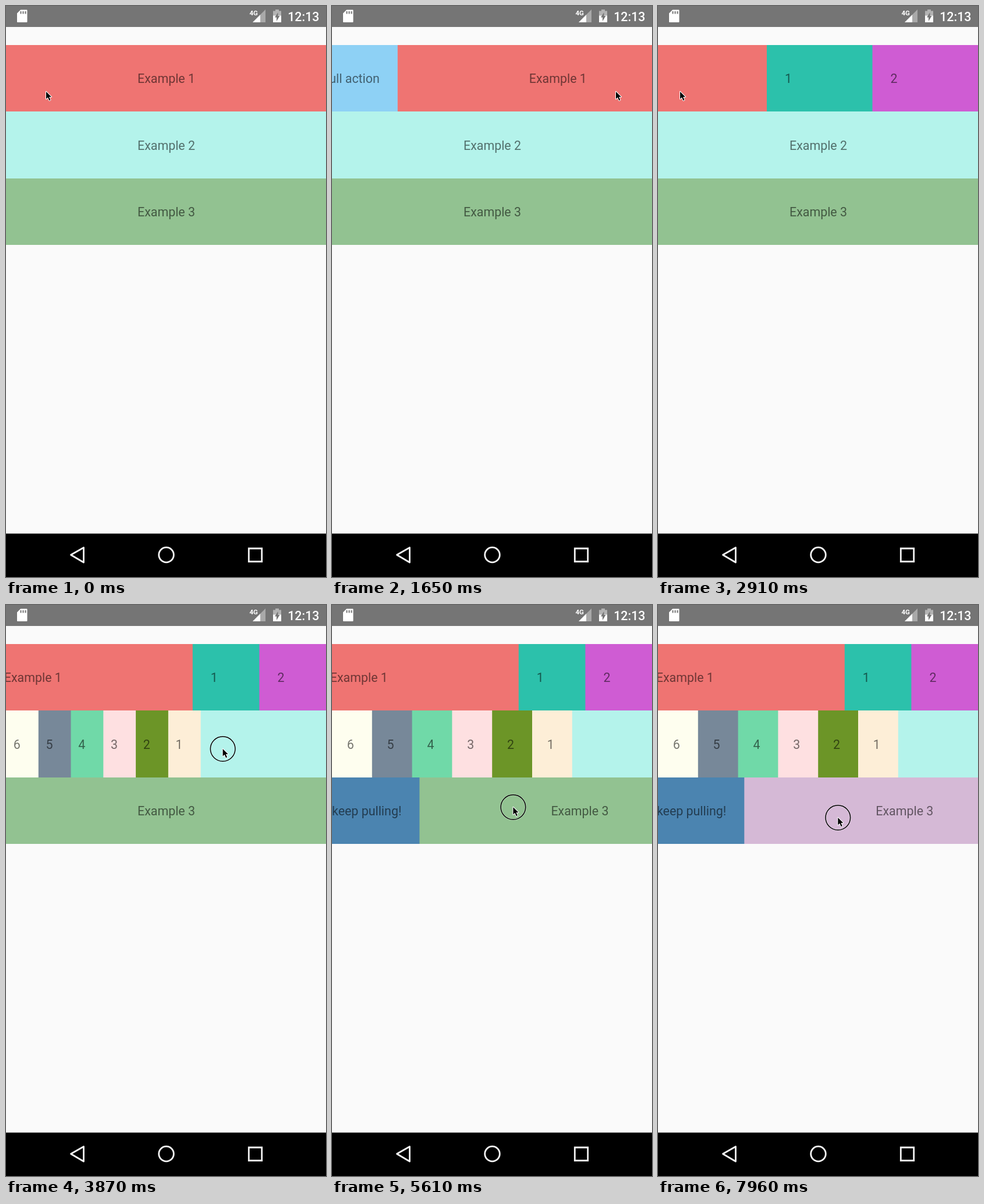
Animation, 550 px wide and 980 px high, one loop 8000 ms. Source, as an HTML page with a canvas:

```html
<!DOCTYPE html>
<html lang="en">
<head>
<meta charset="utf-8">
<title>Swipeable rows</title>
<style>
  html, body { margin: 0; width: 100%; height: 100%; overflow: hidden; background: #fafafa; }
  canvas { display: block; }
</style>
</head>
<body>
<canvas id="stage" width="550" height="980"></canvas>
<script>
const ctx = document.getElementById('stage').getContext('2d');
const LOOP = 8000, WIDTH = 550, ROW_TOP = 66.5, ROW_HEIGHT = 114.6;
const PADDING = 31, SETTLE = 250, ACTIVATION = 306;
const INK = 'rgba(0,0,0,.54)';

// Pointer moves: [start, end, destination]
const xMoves = [[250, 1420, 488], [1950, 2780, 38], [3450, 4070, 480], [4130, 4622, 161],
  [5050, 6254, 496], [6620, 7150, 161], [7400, 8615, 496]];
const yMoves = [[3000, 3350, 247], [4440, 4750, 347], [6700, 7100, 365]];

// Touches: where each swiped row comes to rest after release
const touches = [
  { row: 0, down: 180, up: 1529, rest: 0 },
  { row: 0, down: 1850, up: 2833, rest: -229.2 },
  { row: 1, down: 3400, up: 4110, rest: 412.8 },
  { row: 2, down: 4960, up: 6410, rest: 0 },
  { row: 2, down: 7330, up: 9000, rest: 0 }
];

const rightButtons = ['#2cc1ab', '#cf5cd3'];
const leftButtons = ['#fdeed7', '#6c9527', '#fee0e1', '#70d9a8', '#778899', '#fefeef'];

function track(start, moves, t) {
  let value = start;
  for (const [from, to, target] of moves) {
    if (t <= from) break;
    const s = Math.min(1, (t - from) / (to - from));
    value += (target - value) * s * s * (3 - 2 * s);
  }
  return value;
}
const pointerX = t => track(69, xMoves, t);
const pointerY = t => track(147, yMoves, t);

function swipe(row, t) {
  let offset = 0, active = false;
  for (const touch of touches) {
    if (touch.row !== row || t < touch.down) continue;
    const dragged = pointerX(Math.min(t, touch.up)) - pointerX(touch.down);
    const s = Math.min(1, Math.max(0, t - touch.up) / SETTLE);
    offset = touch.rest + (dragged - touch.rest) * (s ? Math.cos(s * Math.PI / 2) ** 4 : 1);
    if (t < touch.up) offset = dragged;
    active = s < 1 && dragged >= ACTIVATION;
  }
  return { offset, active };
}

function rect(color, x, y, w, h) {
  ctx.fillStyle = color;
  ctx.fillRect(x, y, w, h);
}

function polygon(points, fill, stroke, lineWidth) {
  ctx.beginPath();
  points.forEach(([x, y]) => ctx.lineTo(x, y));
  ctx.closePath();
  if (stroke) {
    ctx.strokeStyle = stroke;
    ctx.lineWidth = lineWidth;
    ctx.stroke();
  }
  if (fill) {
    ctx.fillStyle = fill;
    ctx.fill();
  }
}

function ring(x, y, r, color, lineWidth) {
  ctx.beginPath();
  ctx.arc(x, y, r, 0, Math.PI * 2);
  ctx.strokeStyle = color;
  ctx.lineWidth = lineWidth;
  ctx.stroke();
}

function text(string, x, y, align = 'left', color = INK, font = '400 21.4px') {
  ctx.font = font + ' Roboto, sans-serif';
  ctx.textAlign = align;
  ctx.fillStyle = color;
  ctx.fillText(string, x, y);
}

const rowY = i => Math.round(ROW_TOP + i * ROW_HEIGHT);
const baseline = i => ROW_TOP + (i + .5) * ROW_HEIGHT + 8.4;

function drawRow(i, color, offset) {
  rect(color, 0, rowY(i), WIDTH, rowY(i + 1) - rowY(i));
  text('Example ' + (i + 1), WIDTH / 2 + offset + .5, baseline(i), 'center');
}

function drawLeft(i, color, label, edge) {
  if (edge <= 0) return;
  rect(color, 0, rowY(i), edge, rowY(i + 1) - rowY(i));
  text(label, edge - PADDING, baseline(i), 'right');
}

function drawRows(t) {
  const [first, second, third] = [0, 1, 2].map(i => swipe(i, t));

  drawRow(0, '#ef7472', first.offset);
  drawLeft(0, '#8ed1f5', 'Pull action', first.offset);
  if (first.offset < 0) rightButtons.forEach((color, i) => {
    const x = WIDTH + first.offset * (1 - i / rightButtons.length);
    rect(color, x, rowY(0), WIDTH - x, rowY(1) - rowY(0));
    text(i + 1, x + PADDING, baseline(0));
  });

  drawRow(1, '#b4f3eb', second.offset);
  leftButtons.forEach((color, i) =>
    drawLeft(1, color, i + 1, second.offset * (1 - i / leftButtons.length)));

  drawRow(2, t < 6410 + SETTLE ? '#92c291' : '#d5b9d6', third.offset);
  if (third.active) drawLeft(2, '#f9fbd0', 'release!', third.offset);
  else drawLeft(2, '#4b84b0', 'keep pulling!', third.offset);
}

function drawStatusBar() {
  const bar = '#757575';
  rect(bar, 0, 0, WIDTH, 36);
  ctx.lineJoin = 'round';
  polygon([[25.5, 7.5], [35.5, 7.5], [35.5, 27], [20, 27], [20, 13]], '#fff', '#fff', 2);
  [25, 29, 33].forEach(x => rect(bar, x - .5, 9, 2, 4.5));
  text('4G', 418.5, 16, 'left', '#fff', '700 11.5px');
  polygon([[424, 28], [446, 6], [446, 28]], '#a9a9a9');
  polygon([[424, 28], [437, 15], [437, 28]], '#fff');
  rect('#b3b3b3', 463, 6, 6, 3);
  rect('#b3b3b3', 459, 8.5, 14, 9);
  rect('#fff', 459, 16.5, 14, 11.5);
  polygon([[467.5, 11], [462, 19.5], [465, 19.5], [465, 26], [470.5, 17], [467.5, 17]], bar);
  text('12:13', 538.5, 25.5, 'right', '#fff', '500 21.4px');
}

function drawNavBar() {
  rect('#000', 0, 905.5, WIDTH, 74.5);
  polygon([[111.5, 942], [133.5, 929.5], [133.5, 955]], null, '#f4f4f4', 2.8);
  ring(275.5, 942, 12.8, '#f4f4f4', 2.8);
  ctx.lineJoin = 'miter';
  polygon([[417.3, 931], [439.7, 931], [439.7, 953.5], [417.3, 953.5]], null, '#f4f4f4', 2.8);
}

function drawPointer(t) {
  const x = pointerX(t), y = pointerY(t);
  if (touches.some(touch => t >= touch.down && t < touch.up)) {
    ring(x, y, 21.3, 'rgba(255,255,255,.35)', 3);
    ring(x, y, 21.3, '#000', 1.5);
  }
  const arrow = [[0, 0], [0, 12.5], [3, 9.8], [5.4, 15.2], [7.4, 14.3], [5.1, 9.1], [9, 9]];
  ctx.lineJoin = 'round';
  polygon(arrow.map(([dx, dy]) => [x + dx, y + dy]), '#000', '#fff', 2);
}

function frame(now) {
  const t = now % LOOP;
  rect('#fafafa', 0, 0, WIDTH, 980);
  drawRows(t);
  drawStatusBar();
  drawNavBar();
  drawPointer(t);
  requestAnimationFrame(() => frame(performance.now() - start));
}
const start = performance.now();
frame(0);
</script>
</body>
</html>
```
